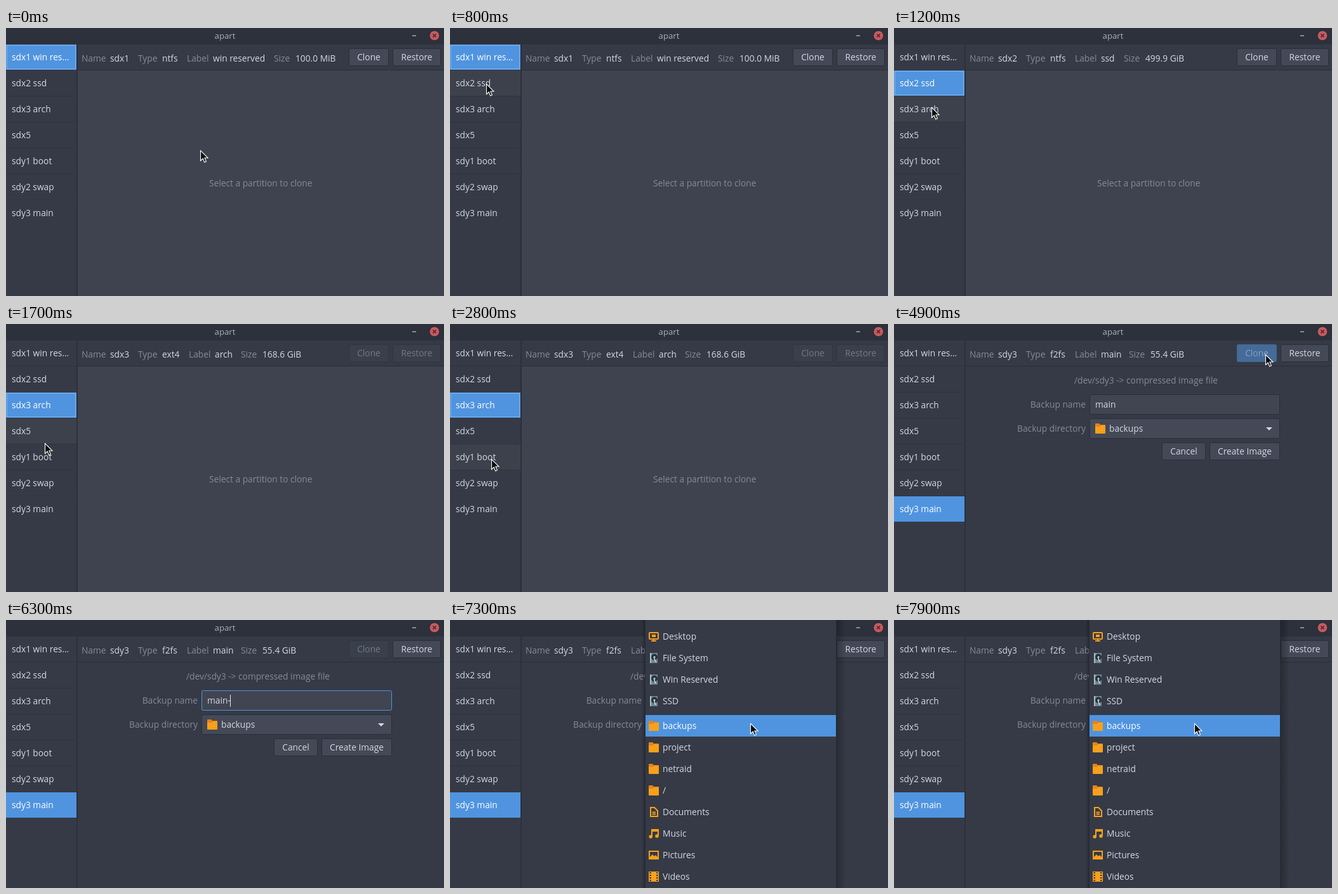
These frames come from a looping animation (690x423 px, 8 s). An HTML page:

```html
<!DOCTYPE html>
<html lang="en">
<head>
<meta charset="utf-8">
<title>apart</title>
<style>
html, body { margin: 0; width: 690px; height: 423px; overflow: hidden; background: #353a46; }
svg { display: block; }
text { font: 13.75px "Open Sans", "Noto Sans", sans-serif; fill: #d3d9e2; white-space: pre; }
.dim { fill: #858b96; }
.title { font-size: 13.2px; fill: #abb1bb; }
.off text { fill: #737a87; }
.off.lit text { fill: #83a2cd; }
.off .face { fill: #3a3f4c; stroke: #30353f; }
.face { fill: #444957; stroke: #2a2e38; }
.hot .face { fill: #4c5262; }
.icon { fill: #f9a01b; }
.line { fill: none; stroke: #f9a01b; stroke-width: 2; }
</style>
</head>
<body>
<svg id="stage" width="690" height="423" viewBox="0 0 690 423">
  <linearGradient id="shade">
    <stop offset="0" stop-color="#000" stop-opacity=".26"/>
    <stop offset="1" stop-color="#000" stop-opacity="0"/>
  </linearGradient>
</svg>
<script>
const NS = "http://www.w3.org/2000/svg";
const stage = document.getElementById("stage");
const LOOP = 8000, STEP = 100, BLUE = "#5094df";

function el(parent, tag, attrs = {}, content) {
  const node = document.createElementNS(NS, tag);
  for (const key in attrs) node.setAttribute(key, attrs[key]);
  if (content) node.textContent = content;
  return parent.appendChild(node);
}
const group = (parent, attrs) => el(parent, "g", attrs);
const rect = (parent, x, y, width, height, fill) =>
  el(parent, "rect", { x, y, width, height, fill });
const path = (parent, d, attrs) => el(parent, "path", { d, ...attrs });
const label = (parent, x, y, content, attrs) => el(parent, "text", { x, y, ...attrs }, content);
const show = (node, on) => node.setAttribute("visibility", on ? "visible" : "hidden");

function box(parent, x, y, w, h, attrs) {
  return el(parent, "rect", { x: x + .5, y: y + .5, width: w - 1, height: h - 1, rx: 2, ...attrs });
}
function button(parent, x, y, w, content) {
  const g = group(parent);
  box(g, x, y, w, 28, { class: "face" });
  const glow = box(g, x, y, w, 28, { fill: BLUE, stroke: BLUE, opacity: 0 });
  label(g, x + w / 2, y + 19, content, { "text-anchor": "middle" });
  return { g, glow };
}

// 16px icons, drawn from their top left corner
const icons = {
  folder(g) {
    path(g, "M0 1Q0 0 1 0H6L8 2H15Q16 2 16 3V6H0Z", { fill: "#e8821a" });
    path(g, "M0 5H7L9 3H16V15Q16 16 15 16H1Q0 16 0 15Z", { class: "icon" });
  },
  desktop(g) {
    path(g, "M2 2H14Q15 2 15 3V11Q15 12 14 12H2Q1 12 1 11V3Q1 2 2 2ZM4 15H12", { class: "line" });
    rect(g, 5, 5, 6, 4, "#f9a01b");
    rect(g, 7, 12, 2, 3, "#f9a01b");
  },
  drive(g) {
    rect(g, 2, 0, 12, 16, "#6f8793");
    rect(g, 2, 0, 2, 16, "#a9bcc5");
    el(g, "circle", { cx: 9, cy: 6.5, r: 5, fill: "#26323d" });
    el(g, "circle", { cx: 9, cy: 6.5, r: 1.6, fill: "#b9cdd6" });
    path(g, "M8.5 8L11 14", { stroke: "#dfe8ec", "stroke-width": 1.5 });
  },
  document(g) {
    path(g, "M3 1H9L14 6V15H3ZM5.5 8.5H11M5.5 11.5H11", { class: "line" });
  },
  music(g) {
    path(g, "M5 13V2H15V11", { class: "line" });
    rect(g, 4, 1, 12, 4, "#f9a01b");
    for (const [cx, cy] of [[3.2, 13], [13, 12]])
      el(g, "circle", { cx, cy, r: 2.8, class: "icon" });
  },
  picture(g) {
    path(g, "M1 2H15V14H1Z", { class: "line" });
    path(g, "M2 13V11L6 7L9 10L11 8L14 11V13Z", { class: "icon" });
  },
  video(g) {
    rect(g, 0, 0, 16, 16, "#f9a01b");
    for (let y = 1; y < 16; y += 4)
      for (const x of [1.5, 12]) rect(g, x, y, 2.5, 2, "#353a46");
  }
};
const icon = (parent, name, x, y) =>
  icons[name](group(parent, { transform: `translate(${x} ${y})` }));

// type, label x, label, size x, size
const parts = {
  "sdx1": ["ntfs", 285, "win reserved", 422, "100.0 MiB"],
  "sdx2": ["ntfs", 285, "ssd", 362, "499.9 GiB"],
  "sdx3": ["ext4", 288, "arch", 370, "168.6 GiB"],
  "sdy3": ["f2fs", 285, "main", 370, "55.4 GiB"]
};
const rowNames = ["sdx1 win res…", "sdx2 ssd", "sdx3 arch", "sdx5", "sdy1 boot", "sdy2 swap", "sdy3 main"];
const rowY = i => 26 + 41 * i;

// window
rect(stage, 0, 0, 690, 423, "#353a46");
const idle = group(stage);
rect(idle, 113, 67, 577, 356, "#3e434f");
label(idle, 320, 250, "Select a partition to clone", { class: "dim" });

// clone form
const form = group(stage);
rect(form, 113, 67, 577, 356, "#353a46");
label(form, 284, 94, "/dev/sdy3 -> compressed image file", { class: "dim" });
label(form, 302, 132, "Backup name", { class: "dim", "text-anchor": "end" });
label(form, 302, 170, "Backup directory", { class: "dim", "text-anchor": "end" });
const entry = box(form, 308, 111, 300, 32, { fill: "#404551" });
const typed = label(form, 317, 132, "main");
const caret = rect(form, 353, 118, 1, 19, "#e4e8ee");
box(form, 308, 149, 300, 32, { class: "face" });
icon(form, "folder", 317, 157);
label(form, 339, 170, "backups");
path(form, "M586 163H596L591 168Z", { fill: "#d3d9e2" });
button(form, 422, 187, 69, "Cancel");
button(form, 497, 187, 111, "Create Image");

// title and header
rect(stage, 0, 0, 690, 26, "#2c313b");
label(stage, 345, 17, "apart", { class: "title", "text-anchor": "middle" });
rect(stage, 640, 11.5, 6, 1.5, "#a4aab4");
el(stage, "circle", { cx: 675, cy: 12, r: 7.3, fill: "#cc575d" });
path(stage, "M672.5 9.5L677.5 14.5M677.5 9.5L672.5 14.5", { stroke: "#2c313b", "stroke-width": 1.6 });
rect(stage, 113, 66, 577, 1, "#292e37");

const headers = {};
for (const name in parts) {
  const [type, labelX, text, sizeX, size] = parts[name];
  const g = headers[name] = group(stage);
  const field = (x, key, gap, value) => {
    label(g, x, 53, key, { class: "dim" });
    label(g, x + gap, 53, value);
  };
  field(119, "Name", 45, name);
  field(208, "Type", 38, type);
  field(labelX, "Label", 41, text);
  field(sizeX, "Size", 34, size);
}
const clone = button(stage, 540, 32, 63, "Clone");
const restore = button(stage, 609, 32, 76, "Restore");

// sidebar
rect(stage, 111, 26, 2, 397, "#2b303a");
const rows = rowNames.map((name, i) => {
  const y = rowY(i);
  const face = rect(stage, 0, y, 111, 40, "none");
  if (i < 6) rect(stage, 0, y + 40, 111, 1, "#2f343e");
  const focus = el(stage, "rect", {
    x: 1.5, y: y + 1.5, width: 108, height: 37, fill: "none",
    stroke: "#a9cbf2", "stroke-dasharray": "1 1"
  });
  const text = label(stage, 9, y + 25, name);
  return { face, focus, text };
});

// directory menu
const menu = group(stage);
rect(menu, 609, 0, 14, 423, "url(#shade)");
el(menu, "rect", { x: -307, width: 5, height: 423, fill: "url(#shade)", transform: "scale(-1 1)" });
rect(menu, 307, 0, 302, 423, "#272b34");
rect(menu, 308, 0, 300, 423, "#353a46");
rect(menu, 308, 150, 300, 34, BLUE);
[["Desktop", "desktop"], ["File System", "drive"], ["Win Reserved", "drive"], ["SSD", "drive"],
 ["backups", "folder"], ["project", "folder"], ["netraid", "folder"], ["/", "folder"],
 ["Documents", "document"], ["Music", "music"], ["Pictures", "picture"], ["Videos", "video"]
].forEach(([name, kind], i) => {
  const y = 31 + 34 * i + (i > 3 ? 5 : 0);
  icon(menu, kind, 313, y - 13);
  const text = label(menu, 335, y, name);
  if (name === "backups") text.style.fill = "#fff";
});

// pointers
const arrow = path(stage, "M.5 .5V16.5L4.2 13L6.7 19L9.4 17.8L6.9 12H12Z",
  { fill: "#0b0c0e", stroke: "#fff", "stroke-width": 1.1 });
const beam = path(stage, "M-3 -8H-1L0 -7L1 -8H3M0 -7V7M-3 8H-1L0 7L1 8H3",
  { fill: "none", stroke: "#fff", "stroke-width": 1.2 });

// time, x, y
const route = [
  [0, 306, 193], [100, 306, 193], [700, 58, 88], [1000, 56, 88], [1200, 59, 125],
  [1500, 60, 130], [1800, 62, 208], [2300, 66, 296], [2800, 65, 213], [3200, 62, 290],
  [3600, 64, 290], [4000, 521, 113], [4500, 585, 50], [4600, 585, 48], [5000, 585, 48],
  [5400, 480, 129], [6600, 480, 129], [6900, 520, 228], [7200, 473, 163], [8000, 473, 163]
];
const press = [[4600, 0], [4700, 1], [4800, .8], [4900, .52], [5200, 0]];
const fade = [[4600, 0], [4900, 1]];

// eased value between the points around t
function at(keys, t, column = 1, ease = true) {
  if (t <= keys[0][0]) return keys[0][column];
  for (let i = 1; i < keys.length; i++) {
    const a = keys[i - 1], b = keys[i];
    if (t > b[0]) continue;
    let k = (t - a[0]) / (b[0] - a[0]);
    if (ease) k = k * k * (3 - 2 * k);
    return a[column] + (b[column] - a[column]) * k;
  }
  return keys[keys.length - 1][column];
}

function render(t) {
  const x = Math.round(at(route, t)), y = Math.round(at(route, t, 2));
  const chosen = t < 900 ? 0 : t < 1500 ? 1 : t < 3300 ? 2 : 6;
  const name = rowNames[chosen].slice(0, 4);

  rows.forEach(({ face, focus, text }, i) => {
    const over = x < 111 && y >= rowY(i) && y < rowY(i) + 41;
    face.setAttribute("fill", i === chosen ? BLUE : over ? "#3c414c" : "none");
    show(focus, i === chosen && t < 4700);
    text.style.fill = i === chosen ? "#fff" : "";
  });
  for (const key in headers) show(headers[key], key === name);

  const mounted = chosen === 2;
  const glow = at(press, t, 1, false);
  clone.g.setAttribute("class",
    mounted || t >= 4800 ? (glow > 0 ? "off lit" : "off") : t === 4600 ? "hot" : "");
  clone.glow.setAttribute("opacity", glow);
  restore.g.setAttribute("class", mounted ? "off" : "");
  form.setAttribute("opacity", at(fade, t, 1, false));

  const focused = t >= 5500 && t < 7300;
  entry.setAttribute("stroke", focused ? BLUE : "#2a2e38");
  const count = Math.max(0, Math.floor((t - 6200) / 100));
  typed.textContent = "main" + "-backup".slice(0, count);
  caret.setAttribute("x", Math.round(317 + typed.getComputedTextLength() - .6));
  show(caret, focused);
  show(menu, t >= 7300);

  const inEntry = t > 5000 && t < 7300 && x > 308 && x < 608 && y > 111 && y < 143;
  const hidden = t >= 6100 && t < 6700;
  for (const pointer of [arrow, beam]) {
    pointer.setAttribute("transform", `translate(${x} ${y})`);
    show(pointer, !hidden && inEntry === (pointer === beam));
  }
}

const start = performance.now();
function tick(now) {
  const t = Math.max(0, now - start) % LOOP;
  render(Math.floor(t / STEP) * STEP);
  requestAnimationFrame(tick);
}
render(0);
requestAnimationFrame(tick);
</script>
</body>
</html>
```
